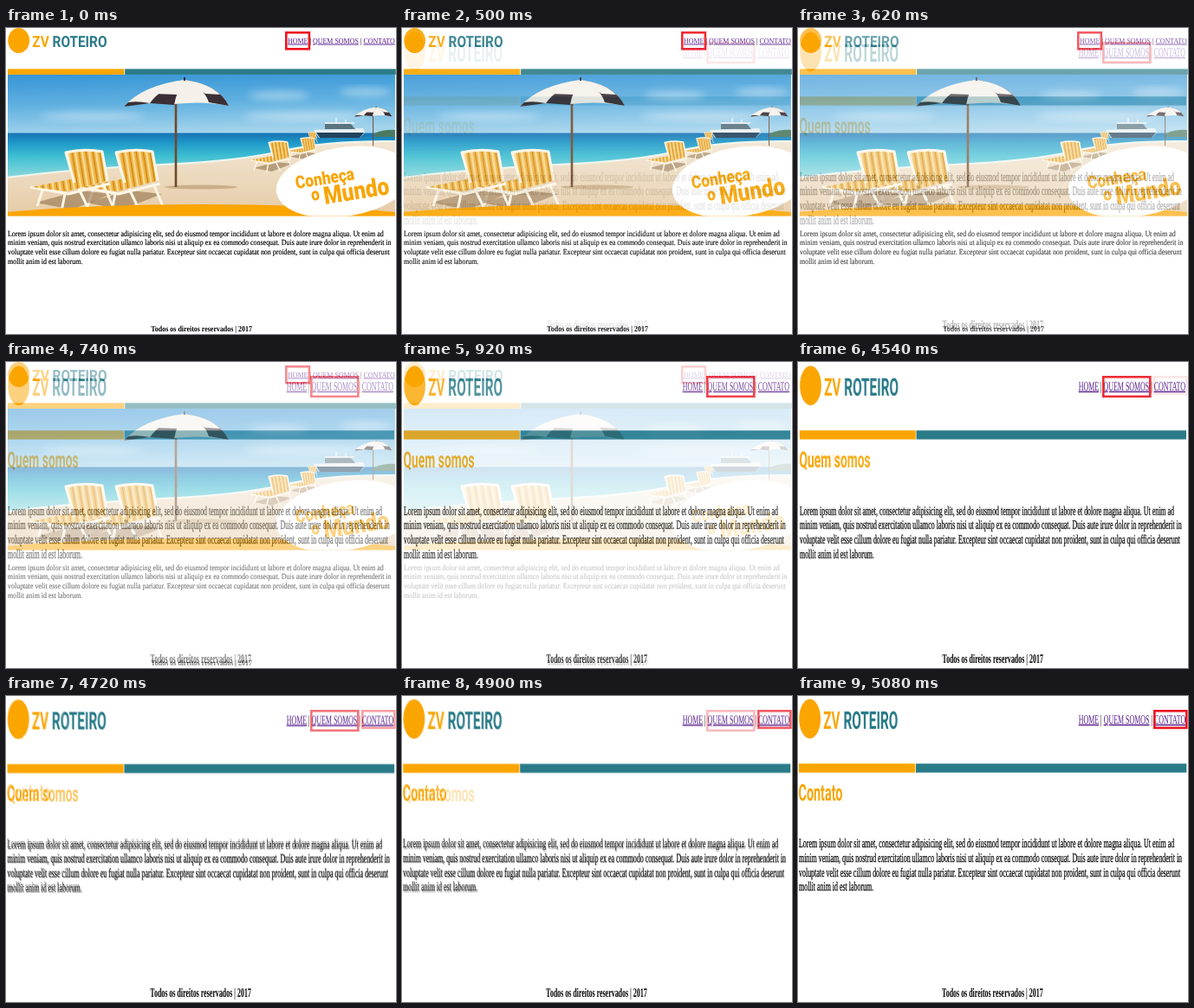
An HTML page for the animation above (8 s loop, 450 by 354 pixels).

```html
<!DOCTYPE html>
<html lang="pt">
<head>
<meta charset="utf-8">
<title>Roteiro</title>
<style>
  html, body { margin: 0; width: 100%; height: 100%; overflow: hidden; background: #fff; }
  svg { display: block; width: 100%; height: 100%; }
  text { font: 16px "Liberation Serif", "Times New Roman", serif; text-rendering: geometricPrecision; white-space: pre; }
  .link { fill: #551a8b; text-decoration: underline; }
  .footer { font-weight: bold; text-anchor: middle; }
  .display { font-family: Roboto, sans-serif; font-weight: 700; fill: #f9a505; }
  .slogan { font-weight: 900; }
  .teal { fill: #2a7b88; }
  .orange { fill: #fba500; }
  .mark { fill: none; stroke: #ec1420; stroke-width: 2.6; }
  .frame { fill: none; stroke: #fdf6e6; stroke-width: 3; stroke-linejoin: round; }
  #lorem { stroke: #000; stroke-width: .3; }
</style>
</head>
<body>
<svg viewBox="0 0 450 354" preserveAspectRatio="none">
  <defs>
    <linearGradient id="sky" x1="0" y1="0" x2=".15" y2="1">
      <stop offset="0" stop-color="#3795d6"/>
      <stop offset=".5" stop-color="#5fb0e0"/>
      <stop offset="1" stop-color="#a4d4ec"/>
    </linearGradient>
    <linearGradient id="sea" x1="0" y1="0" x2="0" y2="1">
      <stop offset="0" stop-color="#1672b4"/>
      <stop offset=".2" stop-color="#1e97c8"/>
      <stop offset=".5" stop-color="#3fbfd2"/>
      <stop offset="1" stop-color="#93dbde"/>
    </linearGradient>
    <linearGradient id="sand" x1="0" y1="0" x2="0" y2="1">
      <stop offset="0" stop-color="#f2e6d3"/>
      <stop offset="1" stop-color="#e6cba6"/>
    </linearGradient>
    <pattern id="stripes" width="8" height="8" patternUnits="userSpaceOnUse" patternTransform="skewX(9)">
      <rect width="8" height="8" fill="#efb03a"/>
      <rect width="2.5" height="8" fill="#f9dc98"/>
      <rect x="5" width="1" height="8" fill="#c07d1c"/>
    </pattern>
    <filter id="soft"><feGaussianBlur stdDeviation="4"/></filter>
    <clipPath id="photoArea"><rect x="2" y="54" width="447" height="163.5"/></clipPath>

    <g id="header">
      <circle class="orange" cx="29.5" cy="25" r="25"/>
      <text class="display" x="61" y="38" style="font-size:31px">ZV <tspan class="teal">ROTEIRO</tspan></text>
      <text x="654" y="31"><tspan class="link">HOME</tspan> | <tspan class="link">QUEM SOMOS</tspan> | <tspan class="link">CONTATO</tspan></text>
      <rect class="orange" x="4" y="81.7" width="270.5" height="11.3"/>
      <rect class="teal" x="276" y="81.7" width="629" height="11.3"/>
    </g>

    <text id="lorem">
      <tspan x="4" dy="0">Lorem ipsum dolor sit amet, consectetur adipisicing elit, sed do eiusmod tempor incididunt ut labore et dolore magna aliqua. Ut enim ad</tspan>
      <tspan x="4" dy="18.3">minim veniam, quis nostrud exercitation ullamco laboris nisi ut aliquip ex ea commodo consequat. Duis aute irure dolor in reprehenderit in</tspan>
      <tspan x="4" dy="18.3">voluptate velit esse cillum dolore eu fugiat nulla pariatur. Excepteur sint occaecat cupidatat non proident, sunt in culpa qui officia deserunt</tspan>
      <tspan x="4" dy="18.3">mollit anim id est laborum.</tspan>
    </text>

    <g id="chair">
      <path d="M34 202L86 188L122 192L76 210Z" fill="#8a6a42" opacity=".55"/>
      <path class="frame" d="M28 184L72 192L120 180M42 188L36 206M68 192L64 212M84 186L95 209M112 180L123 206"/>
      <path d="M30 184L84 173L116 177L70 189Z" fill="url(#stripes)"/>
      <path d="M69 144Q90 139 111 143L117 176Q100 181 79 179Z" fill="url(#stripes)"/>
      <path class="frame" d="M79 179L69 144Q90 139 111 143L117 177"/>
    </g>

    <g id="parasol">
      <path d="M196 80V184" stroke="#70492b" stroke-width="2.6"/>
      <path d="M136 91Q158 66 206 60Q246 66 257 90Q228 84 194 88Q162 85 136 91Z" fill="#f5f1ea"/>
      <path d="M206 60Q178 70 166 87L194 89Q197 72 206 60Z" fill="#3a3035"/>
      <path d="M206 60Q228 68 234 86L257 90Q246 66 206 60Z" fill="#3a3035"/>
      <path d="M206 60Q180 66 170 76L198 77ZM206 60L230 76L247 77Q234 64 206 60Z" fill="#f5f1ea"/>
      <path d="M136 91L141 86Q152 84 166 87Z" fill="#3a3035"/>
      <path d="M206 61V57" stroke="#3a3035" stroke-width="2"/>
    </g>
  </defs>

  <g id="home">
    <g clip-path="url(#photoArea)">
      <rect y="54" width="450" height="70" fill="url(#sky)"/>
      <g fill="#fff" opacity=".4" filter="url(#soft)">
        <ellipse cx="315" cy="78" rx="35" ry="5"/>
        <ellipse cx="415" cy="74" rx="30" ry="5"/>
        <ellipse cx="345" cy="102" rx="70" ry="5"/>
        <ellipse cx="100" cy="102" rx="60" ry="4"/>
      </g>
      <rect y="121.5" width="450" height="54" fill="url(#sea)"/>
      <path d="M425 122Q436 117 450 118V126H425Z" fill="#4c7a60"/>
      <path id="shore" d="M0 173Q90 162 180 158T320 142T450 131V218H0Z" fill="url(#sand)"/>
      <path d="M0 173Q90 162 180 158T320 142T450 131" fill="none" stroke="#eef6ef" stroke-width="2"/>

      <path d="M355 118L412 116L414 121L408 127H361Z" fill="#e9f0f2"/>
      <path d="M358 121H413L408 127H362Z" fill="#22435c"/>
      <path d="M368 117V111H398L403 117Z" fill="#5b7480"/>
      <path d="M368 110H402M381 110V104M392 110V106" fill="none" stroke="#f4f4f4" stroke-width="1.3"/>

      <ellipse cx="225" cy="184" rx="42" ry="2.5" fill="#a9895f" opacity=".5"/>
      <use href="#parasol"/>
      <use href="#parasol" transform="translate(353 70) scale(.36)"/>

      <use href="#chair" transform="translate(335 92) scale(.2)"/>
      <use href="#chair" transform="translate(315 76) scale(.36)"/>
      <use href="#chair" transform="translate(268 59) scale(.51)"/>
      <use href="#chair" transform="translate(58 0)"/>
      <use href="#chair"/>

      <path class="orange" d="M0 213Q100 204 225 204T450 213V218H0Z"/>
      <ellipse cx="390" cy="178" rx="79" ry="40" fill="#fff" transform="rotate(-9 390 178)"/>
      <text class="display slogan" transform="translate(335 186) rotate(-9) scale(.497 .58)" style="font-size:35px">Conheça</text>
      <text class="display slogan" transform="translate(353 200) rotate(-9) scale(.497 .58)" style="font-size:35px">o</text>
      <text class="display slogan" transform="translate(368 204) rotate(-9) scale(.497 .58)" style="font-size:49px">Mundo</text>
    </g>
    <g transform="scale(.497 .58)">
      <use href="#header"/>
      <use href="#lorem" y="415"/>
      <text class="footer" x="454" y="605">Todos os direitos reservados | 2017</text>
    </g>
    <rect class="mark" x="323.3" y="5.3" width="26.6" height="19"/>
  </g>

  <g id="about" opacity="0">
    <rect width="450" height="354" fill="#fff"/>
    <g transform="translate(0 4.5) scale(.495 .915)">
      <use href="#header"/>
      <text class="display" x="3" y="128" style="font-size:28px">Quem somos</text>
      <use href="#lorem" y="188"/>
      <text class="footer" x="454" y="375.5">Todos os direitos reservados | 2017</text>
    </g>
    <rect class="mark" x="352.3" y="17.3" width="54" height="22.6"/>
  </g>

  <g id="contact" opacity="0">
    <rect width="450" height="354" fill="#fff"/>
    <g transform="translate(-1 3.5) scale(.4965 .915)">
      <use href="#header"/>
      <text class="display" x="3" y="128" style="font-size:29px">Contato</text>
      <use href="#lorem" y="187.5"/>
      <text class="footer" x="454" y="376.5">Todos os direitos reservados | 2017</text>
    </g>
    <rect class="mark" x="411.3" y="17.3" width="37" height="19.6"/>
  </g>
</svg>
<script>
  const LOOP = 8000, STEP = 60, STEPS = 10;
  const fades = [["about", 500], ["contact", 4540]]
    .map(([id, start]) => ({ page: document.getElementById(id), start }));

  function draw() {
    const time = performance.now() % LOOP;
    for (const { page, start } of fades) {
      const step = Math.floor((time - start) / STEP) + 1;
      page.setAttribute("opacity", Math.min(Math.max(step / STEPS, 0), 1));
    }
    requestAnimationFrame(draw);
  }
  draw();
</script>
</body>
</html>
```
